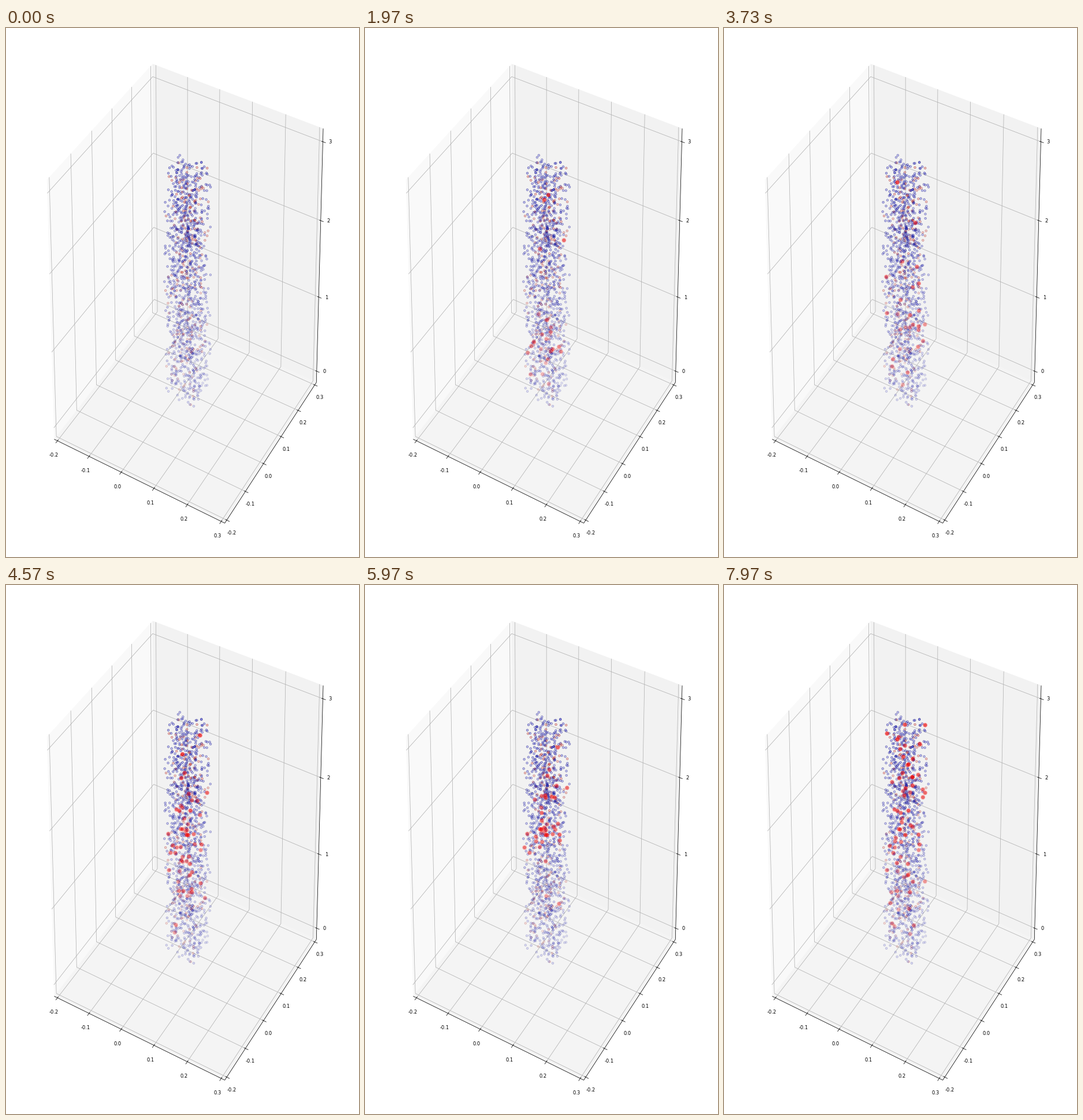
Write a matplotlib script that moves like this. It is 611 px wide and 917 px high and loops after 8000 ms.

```python
import numpy as np
import matplotlib.pyplot as plt
from matplotlib.animation import FuncAnimation
from matplotlib.collections import LineCollection, PolyCollection

W, H, DPI = 611, 917, 64
PX = 72 / DPI                      # points per pixel
FRAMES, INTERVAL = 250, 32
TICK_MS = 1000 / 30                # the firing pattern changes 30 times a second

# Camera: unit cube seen from elevation 30, azimuth -60, distance 10
EL, AZ, DIST = np.radians(30), np.radians(-60), 10
RIGHT = np.array([-np.sin(AZ), np.cos(AZ), 0])
UP = np.array([-np.cos(AZ) * np.sin(EL), -np.sin(AZ) * np.sin(EL), np.cos(EL)])
TOWARD = np.array([np.cos(AZ) * np.cos(EL), np.sin(AZ) * np.cos(EL), np.sin(EL)])
CENTER = np.array([314.0, 446.1])
SCALE = np.array([3272, -4928])
EDGE = 0.5 + 1 / 48
XY_LIM = (-0.2, 0.3)
Z_LIM = (-0.0866, 3.098)


def project(points):
    p = np.asarray(points, float)
    flat = np.stack([p @ RIGHT, p @ UP], axis=-1)
    return CENTER + SCALE * flat / (DIST - p @ TOWARD)[..., None]


def unit(value, lim):
    return (value - lim[0]) / (lim[1] - lim[0]) - 0.5


fig = plt.figure(figsize=(W / DPI, H / DPI), dpi=DPI, facecolor="white")
ax = fig.add_axes([0, 0, 1, 1])
ax.set_xlim(0, W)
ax.set_ylim(H, 0)
ax.axis("off")


def add_lines(paths, color, z):
    ax.add_collection(LineCollection([project(p) for p in paths], colors=color,
                                     linewidths=0.75 * PX, zorder=z))


def label(point, offset, text):
    x, y = project(point) + offset
    ax.text(x, y + 0.8, text, fontsize=8.4 * PX, family="DejaVu Sans",
            ha="center", va="center", zorder=4)


def draw_box():
    e = EDGE
    panes = [
        [(-e, -e, -e), (-e, e, -e), (-e, e, e), (-e, -e, e)],
        [(-e, e, -e), (e, e, -e), (e, e, e), (-e, e, e)],
        [(-e, -e, -e), (e, -e, -e), (e, e, -e), (-e, e, -e)],
    ]
    ax.add_collection(PolyCollection([project(p) for p in panes],
                                     facecolors=["0.975", "0.95", "0.955"],
                                     edgecolors="none", zorder=0))
    grid, ticks = [], []
    inner, outer = 0.1 / 12, 0.2 / 12
    for value in np.linspace(*XY_LIM, 6).round(1) + 0.0:
        q = unit(value, XY_LIM)
        grid.append([(q, -e, -e), (q, e, -e), (q, e, e)])
        grid.append([(e, q, -e), (-e, q, -e), (-e, q, e)])
        ticks.append([(q, -e - outer, -e), (q, -e + inner, -e)])
        ticks.append([(e - inner, q, -e), (e + outer, q, -e)])
        label((q, -e, -e), (-6, 24.5), f"{value:.1f}")
        label((e, q, -e), (8.4, 21.2), f"{value:.1f}")
    for value in range(4):
        q = unit(value, Z_LIM)
        grid.append([(-e, -e, q), (-e, e, q), (e, e, q)])
        ticks.append([(e - inner, e, q), (e + outer, e, q)])
        label((e, e, q), (13, 0), str(value))
    axes = [[(-e, -e, -e), (e, -e, -e)], [(e, -e, -e), (e, e, -e)],
            [(e, e, -e), (e, e, e)]]
    add_lines(grid, "#b0b0b0", 1)
    add_lines(axes + ticks, "black", 2)


def column(rng, count):
    """Cells spread evenly in a square column, sorted from far to near."""
    xy = rng.uniform(0.004, 0.096, (count, 2))
    z = rng.uniform(0.08, 3.0, count)
    p = np.column_stack([unit(xy, XY_LIM), unit(z, Z_LIM)])
    return p[np.argsort(p @ TOWARD)]


rng = np.random.default_rng(12)
cells = column(rng, 1250)
pos, near = project(cells), cells @ TOWARD
fade = 0.25 + 0.75 * (near - near.min()) / np.ptp(near)
is_red = rng.random(len(cells)) < 0.18
red_pos, red_fade = pos[is_red], fade[is_red]


def draw_cells():
    face = np.where(is_red[:, None], (1, 0.2, 0.1, 0.22), (0, 0, 0.95, 0.22))
    edge = np.where(is_red[:, None], (0.55, 0, 0, 0.6), (0, 0, 0.45, 0.62))
    face[:, 3] *= fade
    edge[:, 3] *= fade
    ax.scatter(*pos.T, s=(3.5 * PX) ** 2, c=face, edgecolors=edge,
               linewidths=0.75 * PX, zorder=5)


# Key points of the firing band: time, height on the screen, spread and rate
START_MS = 130
KEY_T = [0, 1070, 2630, 4570, 5970, 6970, 8000]
BAND_Y = [610, 510, 600, 460, 415, 260, 400]
BAND_SPREAD = [50, 35, 90, 90, 45, 35, 170]
BAND_RATE = [0.3, 0.4, 0.22, 0.45, 0.85, 0.35, 0.4]


def firing(t):
    """Mask of the red cells that fire at time t."""
    y = red_pos[:, 1]
    if t < START_MS:
        return np.zeros(len(y), bool)
    center, spread, rate = (np.interp(t, KEY_T, k)
                            for k in (BAND_Y, BAND_SPREAD, BAND_RATE))
    chance = 0.02 + rate * np.exp(-((y - center) / spread) ** 2)
    # activity climbs the column in steps of 25 ticks
    tick = int(t / TICK_MS + 1e-6)
    reach = 505 - 120 * ((tick - 4) // 25) ** 2
    chance[y < reach] = 0
    return np.random.default_rng(1000 + tick).random(len(y)) < chance


draw_box()
draw_cells()
spikes = ax.scatter([], [], s=(7.5 * PX) ** 2, linewidths=0, zorder=6)


def update(i):
    on = firing(i * INTERVAL)
    color = np.tile((0.98, 0.0, 0.0, 0.62), (on.sum(), 1))
    color[:, 3] *= red_fade[on]
    spikes.set_offsets(red_pos[on])
    spikes.set_facecolors(color)
    return (spikes,)


anim = FuncAnimation(fig, update, frames=FRAMES, interval=INTERVAL,
                     init_func=lambda: update(0), repeat=True, repeat_delay=0,
                     blit=False)
plt.show()
```
